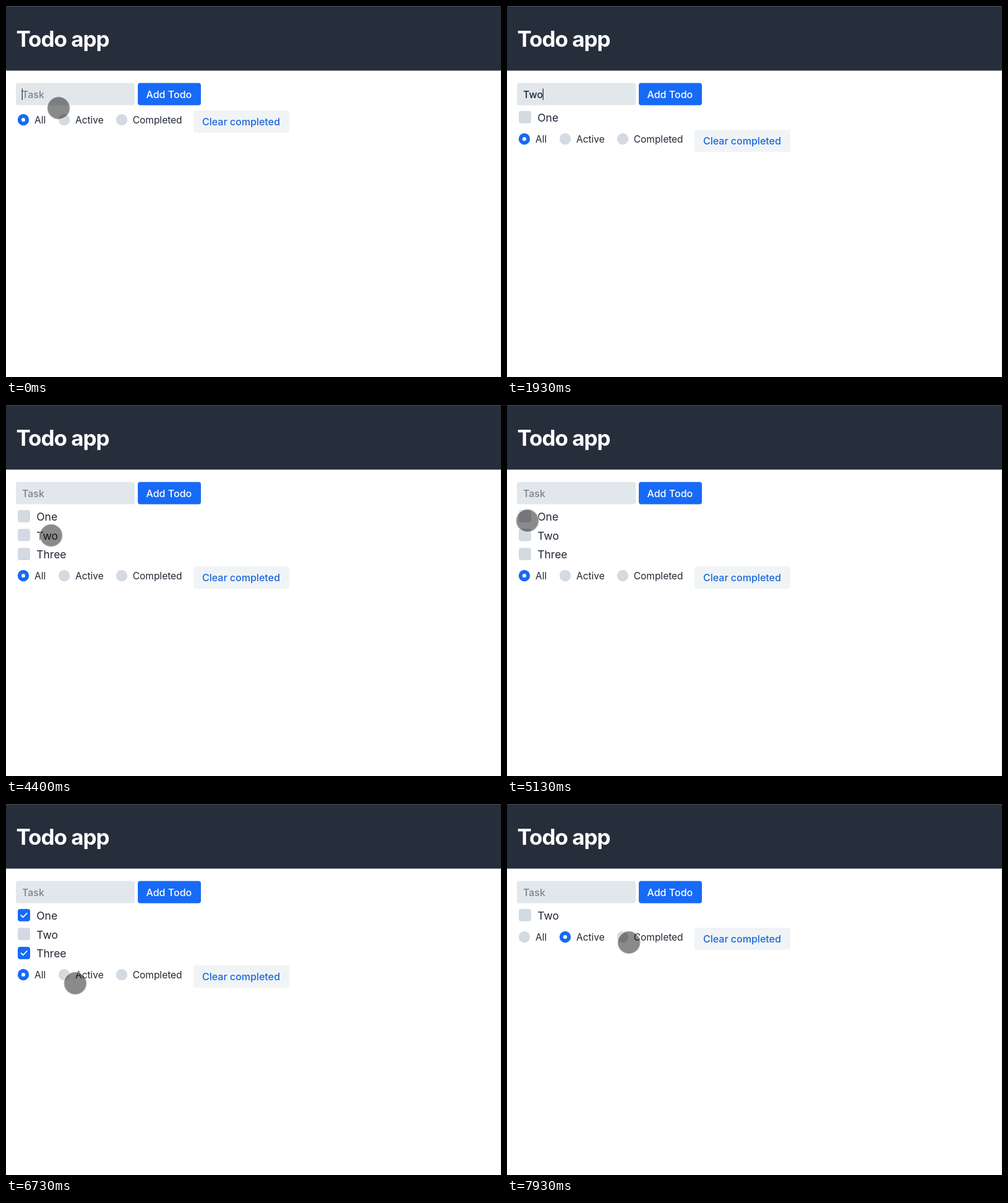
An HTML page that plays this animation: 800 by 600 pixels, repeating every 8000 ms.

```html
<!DOCTYPE html>
<html lang="en">
<head>
<meta charset="utf-8">
<title>Todo app</title>
<style>
  html, body { margin: 0; width: 100%; height: 100%; overflow: hidden; background: #fff; }
  svg { display: block; width: 100%; height: 100%; font: 16px Inter, "Open Sans", sans-serif; fill: #202734; }
  .title { font-size: 35px; font-weight: 700; letter-spacing: -0.03em; fill: #fff; }
  .field, .button { font-weight: 500; }
  .item { font-size: 17.5px; }
  .option { font-size: 15.5px; }
  .idle { fill: #d4dae1; }
  .on { fill: #176af5; }
  .tick { fill: none; stroke: #fff; stroke-width: 1.8; stroke-linecap: round; stroke-linejoin: round; }
</style>
</head>
<body>
<svg id="stage" viewBox="0 0 800 600">
  <rect width="800" height="600" fill="#fff"/>
  <rect x="799" y="104" width="1" height="496" fill="#ebedef"/>
  <rect width="800" height="104.5" fill="#262d3b"/>
  <rect width="800" height="1" fill="#4b525d"/>
  <text class="title" x="16.5" y="66">Todo app</text>

  <rect x="16" y="124.5" width="192" height="36" rx="4" fill="#e2e7eb"/>
  <text id="field" class="field" x="26" y="149"></text>
  <rect id="caret" y="133.5" width="1.2" height="18.5"/>
  <rect class="on" x="213" y="124.5" width="102" height="36" rx="4"/>
  <text class="button" x="226.5" y="149" fill="#fff">Add Todo</text>

  <g id="list"></g>
  <g id="footer">
    <g id="options"></g>
    <rect x="303" y="169" width="155" height="36" rx="4" fill="#f0f4f6"/>
    <text class="button" x="317" y="193" fill="#1b66dc">Clear completed</text>
  </g>
  <circle id="pointer" r="18.5" fill="#000" fill-opacity=".46" stroke="#fff" stroke-opacity=".45" stroke-width="2"/>
</svg>
<script>
const DURATION = 8000;
const ROW = 30.6;
const POINTER_HIDE = 200, POINTER_SHOW = 4130, FILTER_ACTIVE = 7070;

const typing = [
  [0, ""], [200, "O"], [600, "On"], [730, "One"], [1130, ""],
  [1470, "T"], [1670, "Tw"], [1930, "Two"], [2200, ""],
  [2400, "T"], [2800, "Th"], [3000, "Thr"], [3070, "Thre"], [3270, "Three"], [3670, ""]
];
const todos = [
  { name: "One", added: 1130, done: 5270 },
  { name: "Two", added: 2200, done: Infinity },
  { name: "Three", added: 3670, done: 6130 }
];
const path = [
  [4130, 85, 165], [4400, 73, 211], [4700, 54, 204], [4930, 40, 191], [5130, 33, 187],
  [5330, 33, 188], [5600, 39, 218], [5800, 45, 250], [6000, 35, 247], [6200, 33, 246],
  [6450, 62, 268], [6730, 112, 290], [6930, 105, 284], [7130, 104, 280],
  [7500, 108, 226], [7700, 138, 223], [7930, 197, 224], [8000, 205, 224]
];

const $ = id => document.getElementById(id);
const show = (node, visible) => node.setAttribute("visibility", visible ? "visible" : "hidden");

function add(parent, tag, attrs, text = "") {
  const node = document.createElementNS("http://www.w3.org/2000/svg", tag);
  for (const key in attrs) node.setAttribute(key, attrs[key]);
  node.textContent = text;
  return parent.appendChild(node);
}

for (const todo of todos) {
  todo.row = add($("list"), "g", {});
  todo.box = add(todo.row, "rect", { x: 19, y: 169.7, width: 20, height: 20, rx: 4 });
  todo.tick = add(todo.row, "path", { class: "tick", d: "M24.3 180l3.2 3.2 6.4-6.6" });
  add(todo.row, "text", { class: "item", x: 49.2, y: 187 }, todo.name);
}

const options = [["All", 28, 46], ["Active", 94, 112], ["Completed", 187, 204.7]].map(([label, cx, x]) => {
  const group = $("options");
  const disc = add(group, "circle", { cx, cy: 184, r: 9.2 });
  const dot = add(group, "circle", { cx, cy: 184, r: 3.1, fill: "#fff" });
  add(group, "text", { class: "option", x, y: 189.7 }, label);
  return { disc, dot };
});

function pointerAt(t) {
  const i = path.findIndex(point => point[0] > t);
  if (i < 1) return path[0].slice(1);
  const [t0, x0, y0] = path[i - 1], [t1, x1, y1] = path[i];
  const k = (t - t0) / (t1 - t0);
  return [x0 + (x1 - x0) * k, y0 + (y1 - y0) * k];
}

function draw(t) {
  const value = typing.filter(step => step[0] <= t).pop()[1];
  const field = $("field");
  field.textContent = value || "Task";
  field.setAttribute("fill", value ? "#202734" : "#7d848b");
  $("caret").setAttribute("x", 25.6 + (value ? field.getComputedTextLength() : 0));
  show($("caret"), t < POINTER_SHOW);

  const filtered = t >= FILTER_ACTIVE;
  let count = 0;
  for (const todo of todos) {
    const done = t >= todo.done;
    const visible = t >= todo.added && !(filtered && done);
    show(todo.row, visible);
    show(todo.tick, visible && done);
    todo.box.setAttribute("class", done ? "on" : "idle");
    if (visible) todo.row.setAttribute("transform", `translate(0 ${count++ * ROW})`);
  }
  $("footer").setAttribute("transform", `translate(0 ${Math.round(count * ROW)})`);
  options.forEach(({ disc, dot }, i) => {
    const selected = i === (filtered ? 1 : 0);
    disc.setAttribute("class", selected ? "on" : "idle");
    show(dot, selected);
  });

  const [x, y] = pointerAt(t);
  $("pointer").setAttribute("transform", `translate(${x} ${y})`);
  show($("pointer"), t < POINTER_HIDE || t >= POINTER_SHOW);
}

const start = performance.now();
function tick() {
  draw((performance.now() - start) % DURATION);
  requestAnimationFrame(tick);
}
tick();
</script>
</body>
</html>
```
